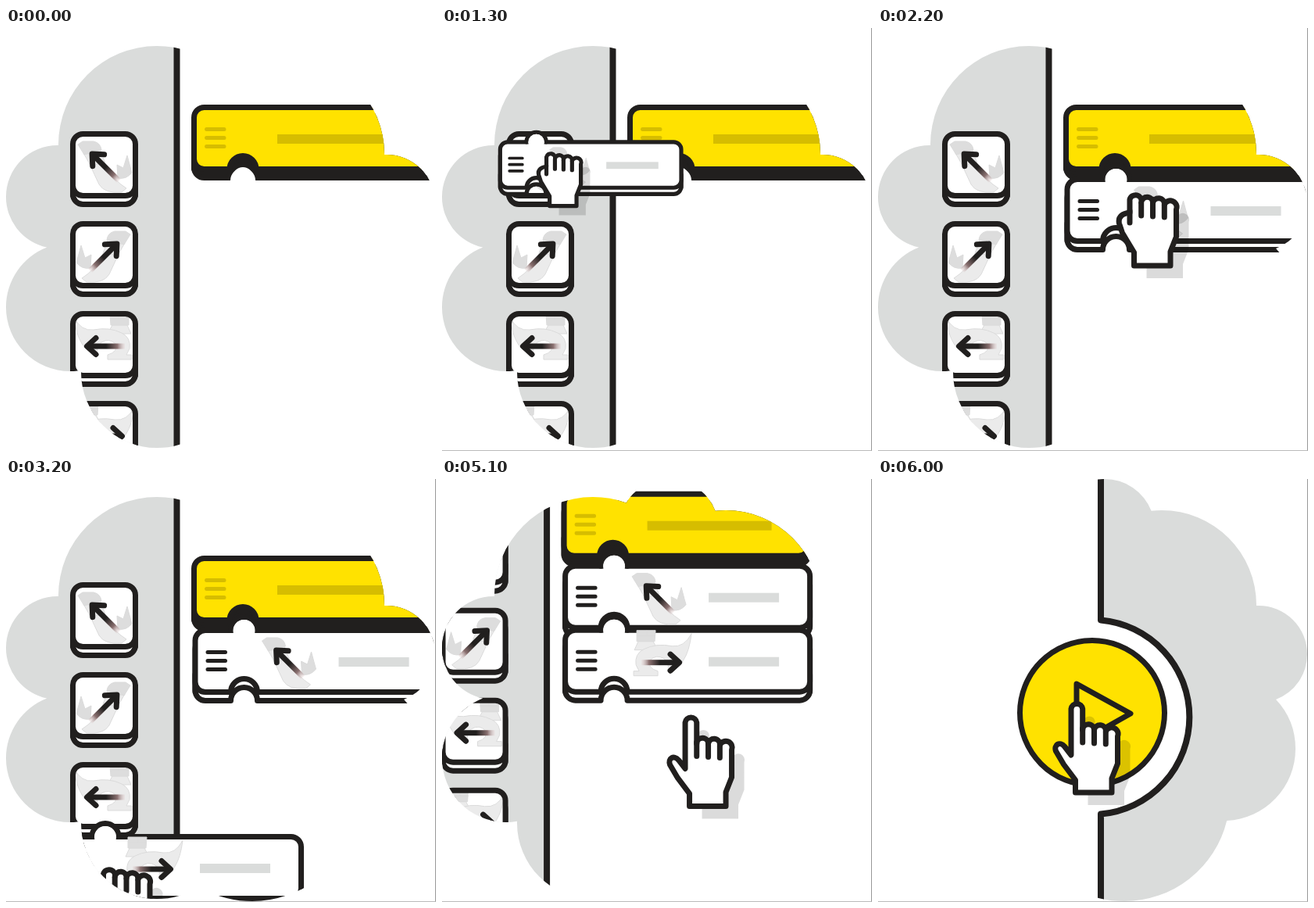
Animation, 550 px wide and 541 px high, one loop 6300 ms. Source, as an HTML page:

```html
<!DOCTYPE html>
<html lang="en">
<head>
<meta charset="utf-8">
<title>Drag blocks and play</title>
<style>
  html, body { margin: 0; width: 100%; height: 100%; overflow: hidden; background: #fff; }
  svg { display: block; width: 100%; height: 100%; }
  .ink { fill: none; stroke: #211f1e; stroke-width: 7; stroke-linecap: round; stroke-linejoin: round; }
  .white { fill: #fff; }
  .gray { fill: #dadcdb; }
  .faint { fill: #ebebeb; stroke: #dbdbdb; stroke-width: 1; stroke-linejoin: round; }
  .faint .deep { fill: #dddddd; }
  .shadow { fill: #000; fill-opacity: .14; }
</style>
</head>
<body>
<svg id="stage" viewBox="0 0 550 541"></svg>
<script>
const LOOP = 6300;
const SCROLL = [-600, -585];
const CLOUD = [
  [193, 149, 126], [290, 64, 64], [363, 161, 121], [487, 224, 62], [442, 345, 92],
  [315, 405, 135], [193, 440, 97], [82, 357, 82], [66, 216, 66]
];

// ---------- drawing ----------
const at = (x, y, body) => `<g transform="translate(${x} ${y})">${body}</g>`;

const cloudShape = CLOUD.map(([x, y, r]) => `<circle cx="${x}" cy="${y}" r="${r}"/>`).join('') +
  `<polygon points="${CLOUD.map(c => c.slice(0, 2)).join(' ')}"/>`;

// Rounded plate outline, optionally with a round notch in its lower edge.
function platePath(width, notched) {
  const right = width - 3.5, bottom = 82.5, r = 13;
  const notch = notched ? `H83 A17 17 0 0 0 49 ${bottom}` : '';
  return `M${3.5 + r} 3.5 H${right - r} a${r} ${r} 0 0 1 ${r} ${r} V${bottom - r}
    a${r} ${r} 0 0 1 ${-r} ${r} ${notch} H${3.5 + r} a${r} ${r} 0 0 1 ${-r} ${-r}
    V${3.5 + r} a${r} ${r} 0 0 1 ${r} ${-r} Z`;
}

function plate(width, { notched = false, face = '#fff', side = '#fff', art = '' }) {
  const d = platePath(width, notched);
  return `<path class="ink" style="fill:${side}" d="${d}" transform="translate(0 11)"/>
    <path class="ink" d="M3.5 60 V82 M${width - 3.5} 60 V82"/>
    <path fill="${face}" d="${d}"/>${art}<path class="ink" d="${d}"/>`;
}

const menuLines = color =>
  `<path class="ink" style="stroke:${color};stroke-width:5" d="M19.5 31.5 H42 M19.5 42.5 H42 M19.5 53.5 H42"/>`;

const arrow = angle => `<g transform="translate(44 45) rotate(${angle})">
  <rect x="-22" y="-3.5" width="48" height="7" fill="url(#fade)"/>
  <path class="ink" d="M-11 -10.5 L-22.5 0 L-11 10.5"/></g>`;

const limb = `<g class="faint">
  <path d="M17 28 L38 22 L47 47 Q55 62 72 73 L66 78 Q44 80 37 68 L24 40 Z"/>
  <path class="deep" d="M10 17 L16 13 L30 13 Q39 15 40 24 L18 30 Z"/>
  <path class="deep" d="M60 43 L68 47 L73 31 L77 46 L79 53 Q72 62 61 60 Z"/>
  <path d="M26 45 L45 39" fill="none"/></g>`;

const horns = `<g class="faint">
  <path d="M54 18 H73 L78 29 H48 Z"/>
  <path d="M5 8 Q14 26 30 24 Q50 20 66 28 Q78 34 76 48 L72 56 H79 V62 H48 V56
    Q62 52 58 42 Q50 34 40 40 Q32 48 36 56 Q10 52 5 8 Z"/>
  <path class="deep" d="M51 4 H75 V18 H52 Z M51 11 H75 M62 4 V11"/></g>`;

const flip = body => `<g transform="translate(87 0) scale(-1 1)">${body}</g>`;
const icons = [
  limb + arrow(45),
  flip(limb) + arrow(135),
  horns + arrow(0),
  flip(horns) + arrow(180)
];

const block = (icon, i) => at(82, 132 + 115 * i, plate(87, { art: icon }));

const row = (icon, iconX) => plate(320, { notched: true }) +
  '<path class="ink" style="fill:#fff" d="M49 3.5 A17 17 0 0 1 83 3.5"/>' +
  '<circle class="white" cx="66" cy="4" r="14"/>' + menuLines('#211f1e') +
  '<rect class="gray" x="187" y="38" width="90" height="12"/>' + at(iconX, 0, icon);

const yellowRow = plate(320, { notched: true, face: '#ffe200', side: '#211f1e' }) +
  '<circle class="white" cx="66" cy="97" r="16"/>' + menuLines('#d6bd00') +
  '<rect x="110" y="38" width="159" height="12" fill="#d6bd00"/>';

// Both hands share palm and three fingers; the origin is the middle of the wrist.
const fingers = `A7.4 7.4 0 0 1 1 -79.5 A7.4 7.4 0 0 1 15.8 -78 A7.4 7.4 0 0 1 31 -72
  V-37 L23.5 -18 V0 Z`;
const HANDS = {
  point: {
    outline: `M-23 0 V-16 L-38 -36 L-48 -53 C-51 -61 -43 -66 -37 -59 L-28.5 -48 V-107
      A7.4 7.4 0 0 1 -13.8 -107 V-80 ${fingers}`,
    creases: 'M-13.8 -82 V-64 M1 -79 V-63 M15.8 -77 V-62'
  },
  grab: {
    outline: `M-23 0 V-17 L-38 -42 L-42 -54 C-44 -63 -37 -67 -28.5 -68 V-84.5
      A7.4 7.4 0 0 1 -13.8 -81 ${fingers}`,
    creases: 'M-28.5 -70 V-55 M-13.8 -80 V-64 M1 -79 V-63 M15.8 -77 V-62'
  }
};
const handArt = ({ outline, creases }) =>
  `<path class="shadow" d="${outline}" transform="translate(16 16)"/>
   <path class="ink" style="fill:#fff" d="${outline}"/><path class="ink" d="${creases}"/>`;

const notchLine = 'M285 -1500 V180.5 A124.5 124.5 0 0 1 285 428.5 V1500';
const playScene = `<path class="gray" d="${notchLine} H2000 V-1500 Z"/>
  <path class="ink" style="stroke-width:8" d="${notchLine}"/>
  <circle class="ink" style="fill:#ffe200" cx="274" cy="299" r="92.5"/>
  <path class="ink" d="M254 262 L323 300 L254 339 Z"/>`;

document.getElementById('stage').innerHTML = `
  <defs>
    <clipPath id="cloud">${cloudShape}</clipPath>
    <linearGradient id="fade" gradientUnits="userSpaceOnUse" x1="-22" y1="0" x2="26" y2="0">
      <stop offset=".5" stop-color="#211f1e"/>
      <stop offset=".8" stop-color="#8a7070"/>
      <stop offset="1" stop-color="#e4d2d2" stop-opacity=".3"/>
    </linearGradient>
  </defs>
  <g id="edges"><path d="M549.5 0 V541" stroke="#999"/><path d="M0 540.5 H550" stroke="#bbb"/></g>
  <g class="white">${cloudShape}</g>
  <g clip-path="url(#cloud)">
    <g id="scene">
      <rect class="gray" x="-1000" y="-500" width="1218" height="2500"/>
      <path class="ink" style="stroke-width:8" d="M218.5 -500 V2000"/>
      ${icons.map(block).join('')}
      ${at(237, 98, yellowRow)}
      <g id="row1">${row(icons[0], 79)}</g>
      <g id="row2">${row(icons[3], 83)}</g>
      ${at(-SCROLL[0], -SCROLL[1], playScene)}
    </g>
    <g id="hand"><g id="point">${handArt(HANDS.point)}</g><g id="grab">${handArt(HANDS.grab)}</g></g>
  </g>`;

// ---------- motion ----------
const el = Object.fromEntries(
  ['edges', 'scene', 'row1', 'row2', 'hand', 'point', 'grab'].map(id => [id, document.getElementById(id)]));

const clamp = v => Math.min(1, Math.max(0, v));
const ease = v => v < .5 ? 2 * v * v : 1 - 2 * (1 - v) ** 2;
const progress = (t, start, end) => ease(clamp((t - start) / (end - start)));
const mix = (a, b, k) => a.map((v, i) => v + (b[i] - v) * k);
const add = (a, b) => a.map((v, i) => v + b[i]);
const show = (node, on) => node.style.display = on ? '' : 'none';
const place = (node, [x, y], s = 1) =>
  node.setAttribute('transform', `translate(${x} ${y}) scale(${s})`);

const DRAGS = [
  { row: el.row1, pop: 1200, drop: 2000, release: 2300,
    from: [45, 125], to: [238.5, 190], grip: [112, 114], origin: [103, 70] },
  { row: el.row2, pop: 3000, drop: 3850, release: 4000,
    from: [61, 454], to: [238.5, 272], grip: [92, 136], origin: [82, 99] }
];

// Wrist path of the free, pointing hand: [start, end, destination].
const MOVES = [
  [400, 1120, [142, 258]],
  [2300, 2920, [140, 600]],
  [4850, 5550, [366, 449]],
  [5550, 5980, [275.5, 401]]
];
const HAND_START = [415, 634];

function popScale(t, start) {
  const age = t - start;
  return age < 100 ? .6 + .14 * age / 100 : Math.min(1, .74 + .26 * (age - 100) / 100);
}

function render(t) {
  show(el.edges, t >= 100);

  let wrist = HAND_START, scale = 1, grabbing = false;
  const followMoves = (after, until) => {
    for (const [start, end, goal] of MOVES)
      if (start >= after && start < until && t >= start) wrist = mix(wrist, goal, progress(t, start, end));
  };
  let since = 0;

  for (const drag of DRAGS) {
    followMoves(since, drag.pop);
    since = drag.pop;
    const active = t >= drag.pop;
    show(drag.row, active);
    if (!active) continue;
    const s = popScale(t, drag.pop);
    const base = mix(drag.from, drag.to, progress(t, drag.pop + 200, drag.drop));
    const corner = add(base, drag.origin.map(v => v * (1 - s)));
    place(drag.row, corner, s);
    wrist = add(corner, drag.grip.map(v => v * s));
    scale = s;
    grabbing = t < drag.release;
  }
  followMoves(since, LOOP);

  place(el.hand, wrist, scale);
  show(el.grab, grabbing);
  show(el.point, !grabbing && t >= 400);
  place(el.scene, mix([0, 0], SCROLL, progress(t, 4856, 5776)));
}

const began = performance.now();
function tick() {
  // The picture advances in steps of a tenth of a second.
  const t = (performance.now() - began) % LOOP;
  render(Math.floor(t / 100) * 100);
  requestAnimationFrame(tick);
}
tick();
</script>
</body>
</html>
```
